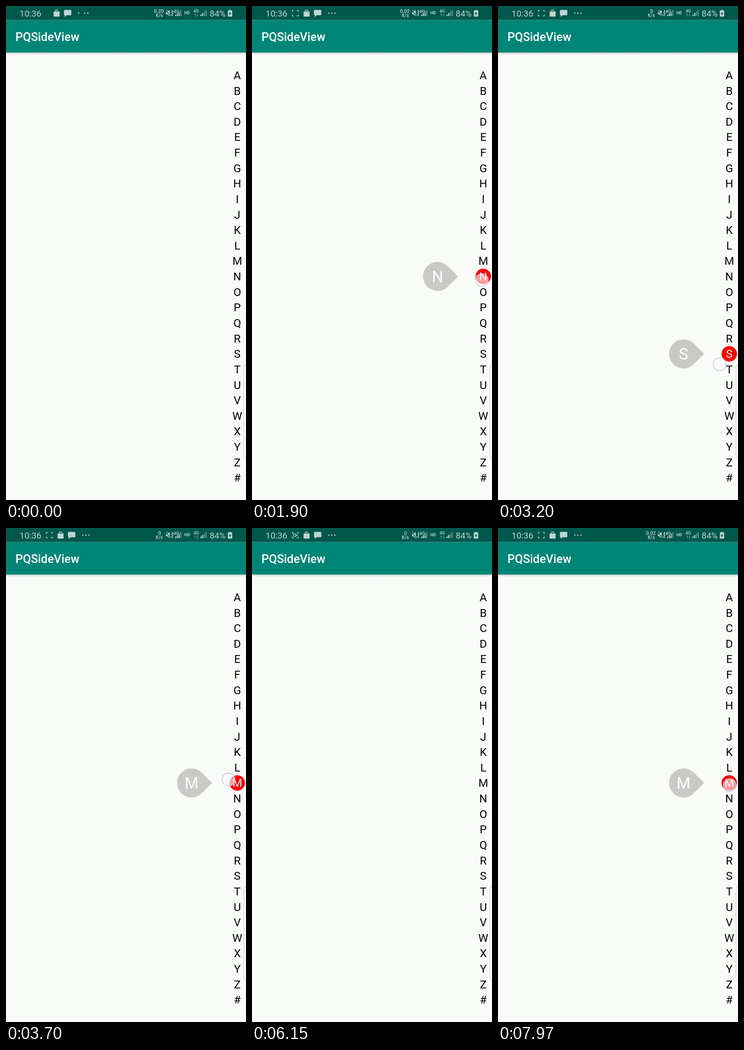
These frames come from a looping animation (522 by 1073 pixels, 8000 ms). An HTML page with a canvas:

```html
<!DOCTYPE html>
<html lang="en">
<head>
<meta charset="utf-8">
<title>PQSideView</title>
<style>
html, body { margin: 0; width: 100%; height: 100%; overflow: hidden; background: #f9fbf9; }
canvas { display: block; width: 522px; height: 1073px; }
</style>
</head>
<body>
<canvas id="stage" width="522" height="1073"></canvas>
<script>
const ctx = document.getElementById('stage').getContext('2d');
const LOOP = 8000;
const LETTERS = 'ABCDEFGHIJKLMNOPQRSTUVWXYZ#';
const FIRST_Y = 150.2, STEP = 33.63, LETTER_X = 503;
const ICON = '#bfd5d2', DIM = '#5f958c', BAR = '#00574b';

// Each touch: [time, x, y] points; the ring fades for `fade` ms after the last one.
const TOUCHES = [
  { fade: 70, path: [
    [1080, 494, 158], [1300, 490, 272.5], [1870, 500, 578], [2250, 500, 790], [2560, 496, 945],
    [2640, 494.5, 955.5], [2740, 492, 956], [3300, 480, 740], [3540, 482, 660],
    [3700, 484, 546.5], [4050, 487, 455], [4370, 491, 406]] },
  { fade: 50, path: [[5350, 500, 190], [5650, 505, 275], [5950, 507, 395], [6090, 506, 408]] },
  { fade: 0, path: [
    [6770, 500, 190], [7050, 506, 290], [7350, 507, 440], [7570, 506, 522],
    [7800, 505, 551], [LOOP, 504, 560]] }
];

const lerp = (a, b, k) => a + (b - a) * k;
const clamp = v => Math.max(0, Math.min(1, v));

function along(path, t) {
  for (let i = 1; i < path.length; i++) {
    const [t0, x0, y0] = path[i - 1], [t1, x1, y1] = path[i];
    if (t <= t1) {
      const k = clamp((t - t0) / (t1 - t0));
      return { x: lerp(x0, x1, k), y: lerp(y0, y1, k) };
    }
  }
  const [, x, y] = path[path.length - 1];
  return { x, y };
}

function touchAt(t) {
  for (const { path, fade } of TOUCHES) {
    const end = path[path.length - 1][0];
    if (t >= path[0][0] && t < end + fade) {
      return { ...along(path, t), down: t < end, alpha: t < end ? 1 : 1 - (t - end) / fade };
    }
  }
  return null;
}

function text(str, x, y, size, color, weight = 400, align = 'left') {
  ctx.font = `${weight} ${size}px Roboto, sans-serif`;
  ctx.textAlign = align;
  ctx.fillStyle = color;
  ctx.fillText(str, x, y);
}

function rect(x, y, w, h, color) {
  ctx.fillStyle = color;
  ctx.fillRect(x, y, w, h);
}

function disc(x, y, r, color) {
  ctx.fillStyle = color;
  ctx.beginPath();
  ctx.arc(x, y, r, 0, Math.PI * 2);
  ctx.fill();
}

function poly(points, color) {
  ctx.fillStyle = color;
  ctx.beginPath();
  points.forEach(([x, y]) => ctx.lineTo(x, y));
  ctx.closePath();
  ctx.fill();
}

function line(points, color, width = 1.4) {
  ctx.strokeStyle = color;
  ctx.lineWidth = width;
  ctx.beginPath();
  points.forEach(([x, y]) => ctx.lineTo(x, y));
  ctx.stroke();
}

function captureIcon(k, recording) {
  ctx.save();
  ctx.translate(94.2, 15.6);
  ctx.scale(lerp(0.35, 1, k), lerp(0.35, 1, k));
  ctx.globalAlpha = lerp(0.12, 1, k);
  for (const sx of [-1, 1]) for (const sy of [-1, 1]) {
    line([[sx * 3.2, sy * 6], [sx * 6.5, sy * 6], [sx * 6.5, sy * 2.8]], ICON);
  }
  if (recording) {
    ctx.lineWidth = 1.3;
    ctx.strokeRect(-3.7, -2.5, 5, 5);
    poly([[1.5, 0], [4.3, -2.5], [4.3, 2.5]], ICON);
  }
  ctx.restore();
}

function bagIcon(x) {
  rect(x - 6.5, 12, 13, 11, ICON);
  ctx.strokeStyle = ICON;
  ctx.lineWidth = 1.5;
  ctx.beginPath();
  ctx.arc(x, 11.6, 3, Math.PI, 0);
  ctx.stroke();
}

function chatIcon(x) {
  ctx.fillStyle = ICON;
  ctx.beginPath();
  ctx.roundRect(x - 8, 8.5, 16, 11.5, 1.5);
  ctx.fill();
  poly([[x - 6, 19], [x - 1, 19], [x - 6, 24]], ICON);
}

function signal(x, lit) {
  for (let i = 0; i < 4; i++) {
    const h = 3.5 + i * 3.2;
    rect(x + i * 3.7, 22 - h, 2.3, h, i < lit ? ICON : DIM);
  }
}

function statusBar(t) {
  rect(0, 0, 522, 30.5, BAR);
  text('10:36', 29.5, 23, 19, ICON);

  const k = clamp(t / 400);
  const recording = (t >= 880 && t < 1880) || (t >= 4890 && t < 6800);
  captureIcon(k, recording);
  bagIcon(lerp(110, 118.7, k));
  chatIcon(lerp(134, 142.7, k));
  [[158, 167], [171.5, 173.7], [178, 180.4]].forEach(([a, b]) => disc(lerp(a, b, k), 15.5, 1.4, ICON));

  const rate = t < 200 ? '0.20' : t >= 3000 && t < 7000 ? '0' : '0.02';
  text(rate, rate === '0' ? 334 : 332.5, 15, 10.6, ICON, 500, 'center');
  text('K/s', 333.5, 24, 10.2, ICON, 500, 'center');

  poly([[348, 13], [351, 13], [356, 8.5], [356, 22.5], [351, 18], [348, 18]], ICON);
  line([[348, 9], [358, 22]], BAR, 2.2);
  line([[349, 8.5], [358.5, 21]], ICON, 1.2);
  line([[361, 9], [363, 11.5], [360.5, 14], [363, 16.5], [360.5, 19], [362.5, 22]], ICON, 1.6);

  signal(368, 3);
  rect(364, 7, 12.5, 9, BAR);
  text('4G', 364.5, 15, 9.6, ICON, 500);
  text('HD', 388, 18.2, 8.8, ICON, 700);
  text('4G', 408, 14, 9.2, ICON, 500);
  line([[411.5, 23], [411.5, 17]], DIM, 1.2);
  line([[409.5, 19], [411.5, 16.8], [413.5, 19]], DIM, 1.1);
  line([[416.5, 16.5], [416.5, 22.5]], DIM, 1.2);
  line([[414.5, 20.5], [416.5, 22.7], [418.5, 20.5]], DIM, 1.1);
  signal(423, 2);

  text('84%', 443, 23, 18.6, ICON);
  rect(485, 8.5, 4.5, 2, ICON);
  rect(482.5, 10, 9.5, 13, ICON);
  poly([[488.2, 11.5], [484.3, 17.2], [486.8, 17.2], [486, 21.5], [490.2, 15.6], [487.6, 15.6]], BAR);
}

function toolbar() {
  const shade = ctx.createLinearGradient(0, 101, 0, 106);
  shade.addColorStop(0, 'rgba(0,50,45,.22)');
  shade.addColorStop(1, 'rgba(0,50,45,0)');
  rect(0, 101, 522, 5, shade);
  rect(0, 30.5, 522, 70.5, '#008577');
  text('PQSideView', 20.5, 75.8, 25.4, '#fff', 500);
}

function edgeHandle() {
  ctx.beginPath();
  ctx.roundRect(517.5, 777.5, 20, 207, 8);
  ctx.fillStyle = '#fcfdfc';
  ctx.fill();
  ctx.strokeStyle = '#c3c5c3';
  ctx.lineWidth = 1;
  ctx.stroke();
}

function bubble(letter, y) {
  const x = 403.6, r = 31.6;
  ctx.fillStyle = '#c9cac8';
  ctx.beginPath();
  ctx.arc(x, y, r, Math.PI / 4, -Math.PI / 4);
  ctx.lineTo(x + r * Math.SQRT2, y);
  ctx.fill();
  text(letter, x, y + 12.2, 34.5, '#fff', 400, 'center');
}

function sideBar(active) {
  [...LETTERS].forEach((letter, i) => {
    const y = FIRST_Y + i * STEP;
    if (i === active) {
      disc(LETTER_X, y, 16.8, '#fe0000');
      bubble(letter, y);
    }
    text(letter, LETTER_X, y + 8.7, 24.2, i === active ? '#fff' : '#000', 400, 'center');
  });
}

function touchRing({ x, y, alpha }) {
  ctx.globalAlpha = alpha;
  disc(x, y, 14, 'rgba(255,255,255,.6)');
  ctx.strokeStyle = 'rgba(196,198,230,.85)';
  ctx.lineWidth = 1.8;
  ctx.beginPath();
  ctx.arc(x, y, 14, 0, Math.PI * 2);
  ctx.stroke();
  ctx.globalAlpha = 1;
}

function draw(t) {
  rect(0, 0, 522, 1073, '#f9fbf9');
  statusBar(t);
  toolbar();
  edgeHandle();
  const touch = touchAt(t);
  const row = touch && touch.down ? Math.floor((touch.y - 140) / STEP) : -1;
  sideBar(row);
  if (touch) touchRing(touch);
}

const start = performance.now();
function tick() {
  draw((performance.now() - start) % LOOP);
  requestAnimationFrame(tick);
}
tick();
</script>
</body>
</html>
```
